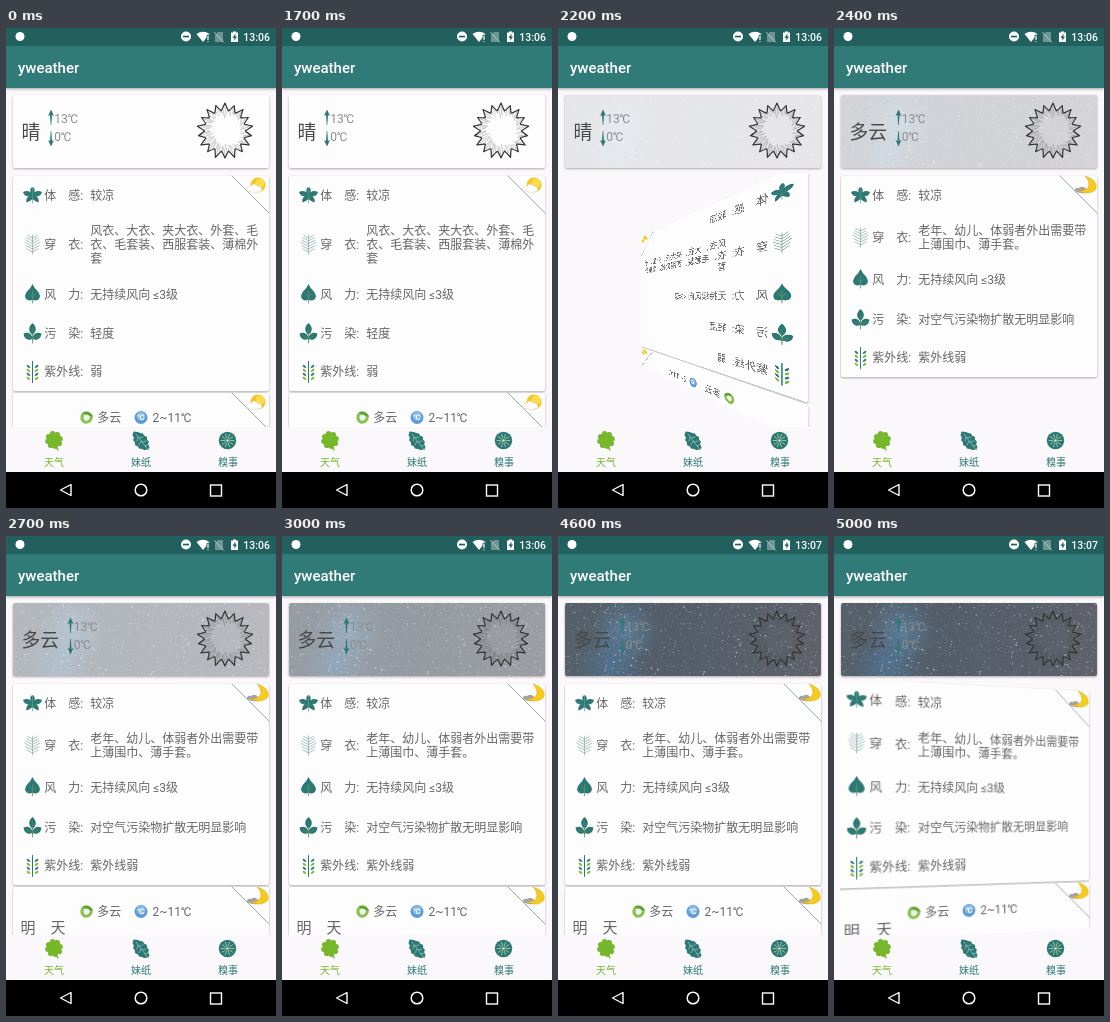
These frames come from a looping animation (270x480 px, 5.1 s). An HTML page with a canvas:

```html
<!DOCTYPE html>
<html lang="zh">
<head>
<meta charset="utf-8">
<title>yweather</title>
<style>
  html, body { margin: 0; width: 100%; height: 100%; overflow: hidden; background: #faf8fb; }
  #stage { position: absolute; left: 0; top: 0; width: 270px; height: 480px; overflow: hidden; background: #faf8fb; }
  svg, canvas { position: absolute; left: 0; top: 0; display: block; }
  text { font-family: Roboto, "Noto Sans CJK SC", "Noto Sans CJK", sans-serif; fill: #666; font-size: 12px; }
  #sky { left: 7px; top: 67px; border-radius: 2px; }
  #view { position: absolute; left: 6px; top: 146px; width: 259px; height: 254px; overflow: hidden; }
  #list { left: -6px; top: -146px; transform-origin: 135px 272px; }
  .card { fill: #fefdfe; filter: drop-shadow(0 1px 1px rgba(0,0,0,.32)); }
</style>
</head>
<body>
<div id="stage">
  <svg id="base" width="270" height="480"></svg>
  <canvas id="sky" width="256" height="73"></canvas>
  <svg id="head" width="270" height="480"></svg>
  <div id="view"><svg id="list" width="270" height="400"></svg></div>
  <svg id="bars" width="270" height="480"></svg>
</div>
<script>
const $ = id => document.getElementById(id);
const TEAL = '#2b7874', LIME = '#76b82a';
const LOOP = 5100, STEP = 100;

const text = (x, y, s, attrs = '') => `<text x="${x}" y="${y}" ${attrs}>${s}</text>`;
const path = (d, attrs) => `<path d="${d}" ${attrs}/>`;
const fill = (d, color) => path(d, `fill="${color}"`);
const line = (d, color, w = 1) => path(d, `fill="none" stroke="${color}" stroke-width="${w}" stroke-linecap="round" stroke-linejoin="round"`);
const dot = (x, y, r, color) => `<circle cx="${x}" cy="${y}" r="${r}" fill="${color}"/>`;
const card = (y, h) => `<rect class="card" x="7" y="${y}" width="256" height="${h}" rx="2"/>`;
const at = (x, y, s, more = '') => `<g transform="translate(${x} ${y}) ${more}">${s}</g>`;
const each = (n, f) => Array.from({ length: n }, (_, i) => f(i)).join('');
const both = f => f(-1) + f(1);
const clamp = v => Math.min(1, Math.max(0, v));

function polar(r, a) {
  return (r * Math.cos(a)).toFixed(2) + ' ' + (r * Math.sin(a)).toFixed(2);
}

// Leaf glyphs, centred on 0,0
const leaf = 'M0 0C-4 -3 -4 -7 0 -10C4 -7 4 -3 0 0Z';
const lobes = fill('M0 -8Q3 -7 2 -2.500Q5 -5 9.500 -3Q8.500 1 4 1.500Q7 4 6 7.500Q2.500 6.500 0 4Z', TEAL);
const icons = [
  both(s => at(0, 0, lobes, `scale(${s} 1)`))
    + line('M0 -5V8M0 3L-6 -1M0 3L6 -1', '#4d8d7c', .6),
  line('M0 -9V10' + each(6, i => {
    const y = 8 - 2.8 * i, w = 7.5 - Math.abs(i - 2) * .9;
    return both(s => `M0 ${y}L${s * w} ${y - w * .55}`);
  }), '#96b3ac', .8),
  at(0, 0, fill('M0 -10Q2 -6 6 -3Q11 2 7 5.500Q3 7.500 0 5.500Q-3 7.500 -7 5.500Q-11 2 -6 -3Q-2 -6 0 -10Z', TEAL), 'scale(.84 1)')
    + line('M0 -3V9M0 3L-3 0M0 3L3 0', '#5d9365', .8),
  at(0, 2, fill(leaf, TEAL), 'scale(1.1 1.2)')
    + both(s => at(0, 6, fill(leaf, TEAL), `rotate(${s * 58}) scale(1.05)`))
    + line('M0 -4V10M0 6L-5 3M0 6L5 3', '#4d8a58', .8),
  line('M0 -10V11', TEAL, 1)
    + each(4, i => both(s => at(s * 2.2, -3.5 + i * 4, fill(leaf, i % 2 ? LIME : TEAL), `rotate(${s * 48}) scale(.36 .5)`)))
];

const sunMark = dot(252, 157, 7.5, '#f5c51f') + dot(254, 155, 4.5, '#fbdc4c')
  + path('M241 163Q240 158 245 158Q248 154 251 158Q256 158 256 163Q249 166 241 163Z', 'fill="#fff" stroke="#ddd3bd" stroke-width=".6"');
const moonMark = fill('M241 163Q241 159 245 160Q249 157 252 161Q255 161 255 164Q248 167 241 163Z', '#a3a3a3')
  + path('M251 148Q264 152 262 161Q256 168 244 163Q254 163 255 157Q255 152 251 148Z', 'fill="#f5cc1d" stroke="#dca91c" stroke-width=".5"');

const corner = (y, mark) => at(0, y - 148, line('M226 148L263 185', '#8ba3a3', .9) + mark);

function summary(y, title) {
  const cy = y + 24.5;
  const swirl = each(3, i => at(0, 0,
    line('M-3.500 -3.200Q0 -6 4 -3', i ? '#8cc152' : '#5da32f', 3), `rotate(${i * 120 + 20})`));
  return at(80.5, cy, dot(0, 0, 6.5, '#eef3ea') + swirl)
    + text(91.3, cy + 4.4, '多云')
    + at(135, cy, dot(0, 0, 6.5, '#5b9bd8') + dot(0, -1.5, 4.5, '#83b9e8')
      + text(0, 2.6, '℃', 'text-anchor="middle" style="font-size:8px;fill:#fff;font-weight:700"'))
    + text(146.5, cy + 4.4, '2~11℃')
    + text(14.5, y + 45.5, title, 'style="font-size:15px"');
}

const labels = ['体　感:', '穿　衣:', '风　力:', '污　染:', '紫外线:'];
function listMarkup(rows, bottom, mark, title) {
  const body = rows.map(([y, ...lines], i) =>
    at(26.5, y, icons[i]) + text(38.3, y + 4.9, labels[i]) +
    lines.map((s, k) => text(84.3, y + 4.9 + (k - (lines.length - 1) / 2) * 14.2, s)).join('')).join('');
  const y = bottom + 2;
  return card(148, bottom - 148) + body + corner(148, mark)
    + `<g class="next">${card(y, 150)}${corner(y, mark)}${summary(y, title)}</g>`;
}

const lists = {
  day: listMarkup([
    [167, '较凉'],
    [216, '风衣、大衣、夹大衣、外套、毛', '衣、毛套装、西服套装、薄棉外', '套'],
    [266, '无持续风向 ≤3级'],
    [305, '轻度'],
    [343.5, '弱']
  ], 363, sunMark, ''),
  night: listMarkup([
    [167, '较凉'],
    [209, '老年、幼儿、体弱者外出需要带', '上薄围巾、薄手套。'],
    [251, '无持续风向 ≤3级'],
    [291, '对空气污染物扩散无明显影响'],
    [329.5, '紫外线弱']
  ], 349, moonMark, '明　天')
};

// Sketched sun: curved spikes, with shading that is longer at the lower left
function sunDrawing() {
  const n = 18, turn = Math.PI * 2 / n;
  let d = '', hatch = '';
  for (let i = 0; i < n; i++) {
    const a = i * turn - Math.PI / 2;
    d += (i ? 'Q' + polar(21.5, a - turn * .35) + ' ' : 'M') + polar(28 - i % 2, a)
      + 'Q' + polar(21.5, a + turn * .35) + ' ' + polar(20.5, a + turn / 2);
    const depth = 4 + 4 * clamp(Math.cos(a - 2.5));
    for (let k = -1; k <= 1; k++) {
      const b = a + k * .1;
      hatch += 'M' + polar(24 - Math.abs(k) * 2.5, b) + 'L' + polar(20 - depth + (i * 7 + k * 3) % 4, b + .08);
    }
  }
  return at(219, 103, line(hatch, 'rgba(60,60,60,.5)', .6) + line(d + 'Z', '#333', 1.2));
}

function headMarkup(night) {
  const x = night ? 64.5 : 45;
  const arrow = both(s => at(x, 100, fill('M0 18.500L-3 12L-1 13L-.3 3H.3L1 13L3 12Z', TEAL), `scale(1 ${s})`));
  const grey = 'style="fill:#8c8c8c"';
  return text(15.5, 110.5, night ? '多云' : '晴', 'style="font-size:18.75px;fill:#484848"')
    + arrow + text(x + 3.2, 94.5, '13℃', grey) + text(x + 3.2, 112.5, '0℃', grey)
    + sunDrawing();
}

function paintSky() {
  const c = $('sky').getContext('2d');
  let seed = 7;
  const rnd = () => (seed = seed * 16807 % 2147483647) / 2147483647;
  const glow = (x, y, r, color) => {
    const g = c.createRadialGradient(x, y, 0, x, y, r);
    g.addColorStop(0, `rgba(${color},.75)`);
    g.addColorStop(1, `rgba(${color},0)`);
    c.fillStyle = g;
    c.fillRect(0, 0, 256, 73);
  };
  const stars = (n, place, color, size) => {
    for (let i = 0; i < n; i++) {
      c.fillStyle = `rgba(${color},${(.15 + .65 * rnd() ** 2).toFixed(2)})`;
      c.beginPath();
      c.arc(place(), 73 * rnd(), .3 + size * rnd() ** 4, 0, 7);
      c.fill();
    }
  };
  const g = c.createLinearGradient(0, 0, 256, 0);
  g.addColorStop(0, '#55606a');
  g.addColorStop(.4, '#525d69');
  g.addColorStop(1, '#5f616a');
  c.fillStyle = g;
  c.fillRect(0, 0, 256, 73);
  glow(60, 28, 34, '92,132,164');
  glow(46, 60, 34, '78,118,154');
  stars(1500, () => 256 * rnd(), '225,230,236', .6);
  stars(450, () => 54 + 30 * (rnd() + rnd() - 1), '150,190,222', .6);
}

$('base').innerHTML = card(67, 73);

function statusBar() {
  return '<rect width="270" height="18" fill="#21605c"/>'
    + dot(14, 8.5, 4.5, '#fff')
    + dot(180, 8.5, 5, '#fff') + '<rect x="177" y="7.700" width="6" height="1.700" fill="#21605c"/>'
    + fill('M190.500 6Q197 1.500 203.500 6L197 14Z', '#fff') + line('M202 8V11.500M202 13.500V13.600', '#21605c', 3) + line('M202 8V11.500M202 13.500V13.600', '#fff', 1.2)
    + fill('M209 7L212 4H217V14H209Z', '#6d9693') + line('M208.500 4.500L217.500 14', '#b5cbc9', 1)
    + fill('M225 4.500H227V3.500H230V4.500H232V14H225Z', '#fff')
    + fill('M229.500 5.500L226.500 9.700H228.300V12.700L231 8.500H229.300Z', '#21605c')
    + text(264, 12.5, '13:06', 'id="clock" text-anchor="end" style="font-size:10.5px;font-weight:500;fill:#fff"');
}

function tabs() {
  const clover = each(4, i => at(0, 0, fill('M0 0C-7 -3 -6 -9 -2 -8.500Q0 -8.500 0 -7Q0 -8.500 2 -8.500C6 -9 7 -3 0 0Z', LIME), `rotate(${i * 90 + 10})`))
    + line('M0 0Q1 6 4 10', LIME, 1.3);
  const blade = fill('M-7.500 -9.500L-3 -9L-1 -8L2 -7.500L3 -5.500L6 -4L6 -1.500L8 1L7 3L8.500 6L7.500 8.500L3 9L1 8L-2 7.500L-3 5.500L-6 4L-6 1.500L-8 -1L-7 -3L-8.500 -6Z', TEAL)
    + line('M-5 -7L8 10M-3 -4L-4 0M0 0L-2 4M-2 -3L2 -4M1 1L5 0M4 5L7 4', '#b9d6cf', .6);
  const spokes = r => each(10, i => 'M' + polar(2.5, i * Math.PI / 5) + 'L' + polar(r, i * Math.PI / 5));
  const wheel = dot(0, 0, 8.7, TEAL) + line(spokes(6.5), '#b9d6a8', .8) + dot(0, 0, 1.3, '#d5e7c4');
  const label = (x, s, color) => text(x, 437.7, s, `text-anchor="middle" style="font-size:10px;fill:${color}"`);
  return '<rect y="399" width="270" height="45" fill="#faf8fb"/>'
    + at(48, 412, clover) + at(135, 413, blade) + at(221.5, 412.5, wheel)
    + label(48, '天气', LIME) + label(135, '妹纸', TEAL) + label(222, '糗事', TEAL);
}

$('bars').innerHTML =
  '<rect y="18" width="270" height="42" fill="#307a78" style="filter:drop-shadow(0 1.500px 1.500px rgba(0,0,0,.35))"/>'
  + statusBar()
  + text(12, 44.5, 'yweather', 'style="font-size:15px;font-weight:500;fill:#fff"')
  + tabs()
  + '<rect y="444" width="270" height="36"/>'
  + line('M65 456.500V467.500L54.500 462Z', '#fff', 1.4)
  + '<circle cx="135" cy="462" r="5.800" fill="none" stroke="#fff" stroke-width="1.500"/>'
  + '<rect x="204.500" y="457" width="11" height="11" fill="none" stroke="#fff" stroke-width="1.400"/>';

paintSky();

const FLIPS = { day: 1755, night: 4930 }, FLIP_MS = 500, SWAP = 2300;
let shown = '';

function render(t) {
  const mode = t < SWAP ? 'day' : 'night';
  if (mode !== shown) {
    shown = mode;
    $('list').innerHTML = lists[mode];
    $('head').innerHTML = headMarkup(mode === 'night');
  }
  // Accelerating turn about the vertical axis while moving away
  const q = clamp((t - FLIPS[mode]) / FLIP_MS) ** 2;
  $('list').style.transform = q ? `perspective(144px) translateZ(${-77.5 * q}px) rotateY(${180 * q}deg)` : 'none';
  $('list').querySelector('.next').style.opacity = mode === 'day' ? 1 : clamp((t - 2400) / 300);
  $('sky').style.opacity = clamp((t - 1960) / 1700);
  $('clock').textContent = t < 4400 ? '13:06' : '13:07';
}

const start = performance.now();
function tick() {
  const t = (performance.now() - start) % LOOP;
  render(Math.floor(t / STEP) * STEP);
  requestAnimationFrame(tick);
}
tick();
</script>
</body>
</html>
```
